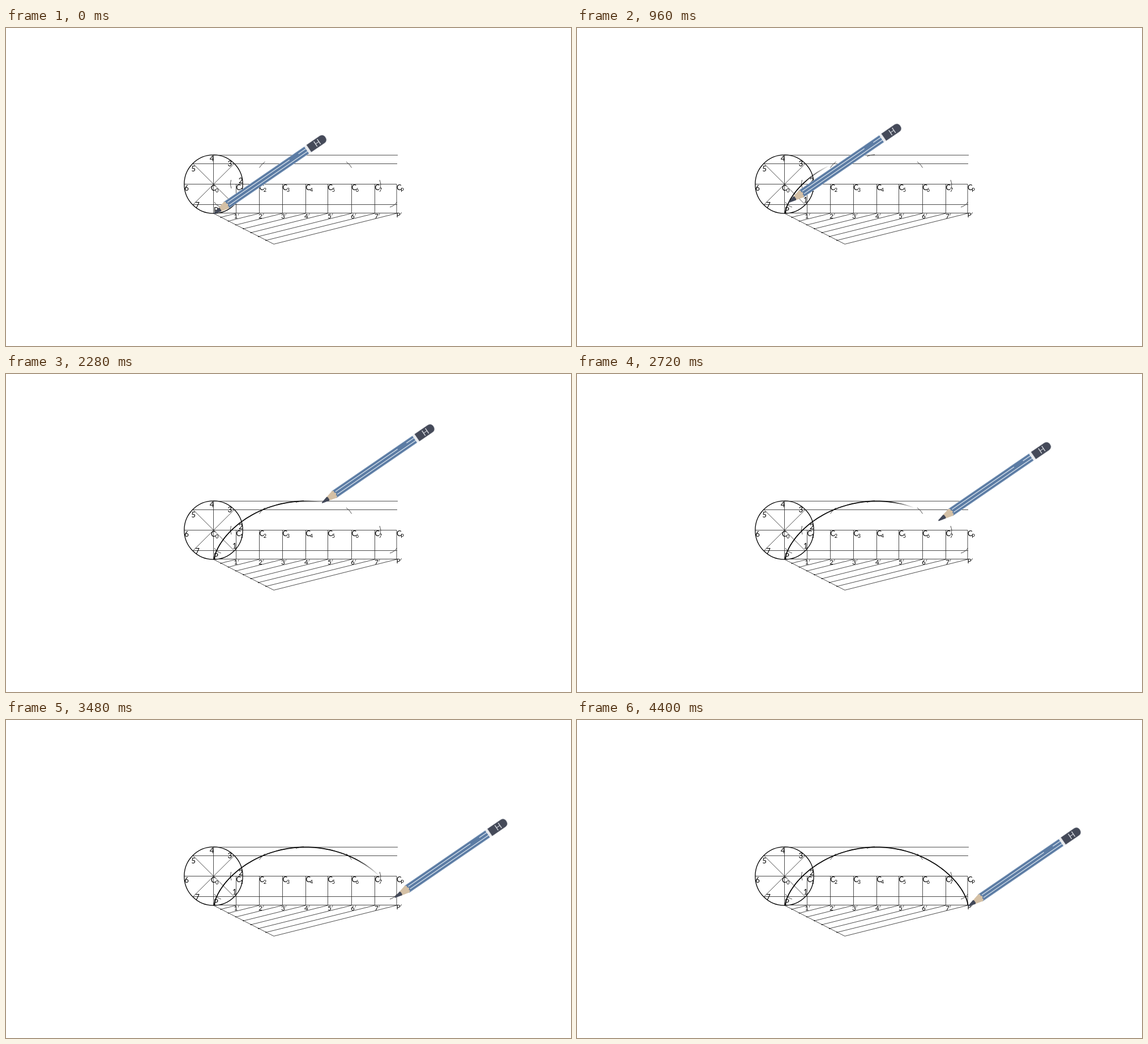
These frames come from a looping animation (998 by 561 pixels, 4440 ms). An HTML page:

```html
<!DOCTYPE html>
<html lang="en">
<head>
<meta charset="utf-8">
<title>Cycloid construction</title>
<style>
  html, body { margin: 0; width: 100%; height: 100%; overflow: hidden; background: #fff; }
  svg { display: block; width: 998px; height: 561px; }
  text { font-family: Lato, "Noto Sans", sans-serif; fill: #000; }
  .thin { fill: none; stroke: #2b2b2b; stroke-width: .85; }
  .bold { fill: none; stroke: #000; stroke-width: 1.7; }
</style>
</head>
<body>
<svg viewBox="0 0 998 561">
  <defs>
    <linearGradient id="fade" gradientUnits="userSpaceOnUse" x1="-42" y1="0" x2="0" y2="0">
      <stop offset="0" stop-color="#fff"/>
      <stop offset="1" stop-color="#000"/>
    </linearGradient>
    <mask id="wipe" maskUnits="userSpaceOnUse" x="0" y="0" width="998" height="561">
      <rect width="998" height="561" fill="url(#fade)"/>
    </mask>
  </defs>
  <g id="plan"></g>
  <g mask="url(#wipe)"><path id="curve" class="bold"/></g>
  <g id="pencil">
    <path d="M25 -7.3H198V7.3H25Z" fill="#5c7ca4" stroke="#b4c5d8" stroke-width=".7"/>
    <path d="M30 -2.8H163M182 -2.8H198M30 2.8H198" stroke="#dde7f0" stroke-width="1.2"/>
    <path d="M10 -3.4L25.5 -7.3Q30 -5 27 -2.8Q32 0 27 2.8Q30 5 25.5 7.3L10 3.4Z" fill="#d4c0a5"/>
    <path d="M-.8 -.8L12 -4Q14.5 -1.5 13 0Q14.5 1.5 12 4L-.8 .8Z" fill="#434959"/>
    <path d="M198 -7.5H202.5V7.5H198Z" fill="#e9ebee"/>
    <path d="M202.5 -7.7H231Q238 -7.2 238 0Q238 7.2 231 7.7H202.5Z" fill="#454a59" stroke="#b9bcc4" stroke-width=".5"/>
    <text x="220.5" y="5.3" text-anchor="middle" style="font-size:15px;fill:#d5d8de">H</text>
  </g>
</svg>
<script>
const NS = "http://www.w3.org/2000/svg";
const $ = id => document.getElementById(id);
const plan = $("plan");

function add(tag, attrs, text) {
  const el = document.createElementNS(NS, tag);
  for (const k in attrs) el.setAttribute(k, attrs[k]);
  if (text) el.textContent = text;
  plan.append(el);
}
const path = d => add("path", { d, class: "thin" });
const line = (x1, y1, x2, y2) => path(`M${x1} ${y1}L${x2} ${y2}`);
const label = (s, x, y, size) => add("text", { x, y, "font-size": size }, s);

// Construction lines
const CX = 366.5, CY = 275.5, R = 52, BASE = 326.5;
const stops = [406.5, 447.5, 488.5, 529.5, 568.5, 610.5, 651.5, 690];

add("circle", { cx: CX, cy: CY, r: R - .3, class: "bold", style: "stroke-width:1.3" });
line(CX, 224, CX, 327);
line(330, 239, 403.5, 312);
line(403.5, 239, 330, 312);
line(CX, 224.3, 692, 224.3);
line(330, 239.5, 691, 239.5);
line(314.5, CY, 690, CY);
line(330, 311.5, 691, 311.5);
line(CX, BASE, 691, BASE);
line(CX, 327, 473, 381.3);

stops.forEach((x, i) => {
  const k = (i + 1) / 8, px = CX + 106.5 * k, py = 327 + 54.3 * k;
  line(x, CY, x, 327);
  line(px, py, x, 327);
  if (i < 7) add("circle", { cx: px - .5, cy: py, r: .9 });
  label("C", x - .1, 286, 13);
  label("1234567P"[i], x + 7.3, 288.7, 9.2);
});
label("C", 362, 287, 13);
label("0", 370, 290, 9.2);

// Compass marks
["M368 307Q372 314 380 316", "M397.5 268Q395 275 398 283",
 "M447.5 246.5Q451.5 240 457.5 236", "M512 226.5Q518 224 526 223.5",
 "M601 236Q607 240 610.5 246.5", "M660 268Q663 275 661.5 282",
 "M678 316Q686 314 690.5 307"].forEach(path);

[["1", 400, 308], ["2", 410.8, 274], ["3", 391.5, 244], ["4", 359.8, 234.5],
 ["5", 327.3, 253], ["6", 315.3, 287], ["7", 334.3, 317], ["P", 367, 326]]
  .forEach(([s, x, y]) => label(s, x, y, 13.2));

[402.5, 446, 486, 527, 568, 609, 651, 689.5].forEach((x, i) => {
  const y = i < 7 ? 336 : 334;
  label("1234567P"[i], x, y, 11.8);
  line(x + 7.6, y - 5.5, x + 9, y - 8.8);
});

// Cycloid traced by a rolling circle of radius r, its flanks slightly flattened
const r = 51.4, TAU = Math.PI * 2;
const roll = a => [367.6 + r * (a - Math.sin(a)),
                   275.7 + r * Math.cos(a) + 1.2 * Math.sin(a) ** 2];
let d = "";
for (let i = 0; i <= 120; i++) {
  const [x, y] = roll(TAU * i / 120);
  d += (i ? "L" : "M") + x.toFixed(2) + " " + y.toFixed(2);
}
$("curve").setAttribute("d", d);

// Share of a full turn reached by the pencil at each time
const turns = [[0, 0], [600, .075], [1160, .197], [1720, .353], [2280, .545],
               [2840, .725], [3400, .857], [3960, .948], [4400, 1]];
const slope = i => {
  const a = turns[Math.max(i - 1, 0)], b = turns[Math.min(i + 1, turns.length - 1)];
  return (b[1] - a[1]) / (b[0] - a[0]);
};
function turnAt(t) {
  let i = 0;
  while (i < turns.length - 2 && t > turns[i + 1][0]) i++;
  const [t0, v0] = turns[i], [t1, v1] = turns[i + 1];
  const h = t1 - t0, u = (t - t0) / h, w = 1 - u;
  return v0 * w * w * (1 + 2 * u) + slope(i) * h * u * w * w
       + v1 * u * u * (3 - 2 * u) - slope(i + 1) * h * u * u * w;
}

const LOOP = 4440, STEP = 40;
function draw(now) {
  let t = Math.floor((now % LOOP) / STEP) * STEP;
  if (t < 80) t = 0;
  const turn = turnAt(t), [x, y] = roll(TAU * turn);
  // The pencil drifts a little off the curve towards the end
  $("pencil").setAttribute("transform",
    `translate(${x + .3 + turn} ${y + .8 * turn}) rotate(-34.4)`);
  $("fade").setAttribute("gradientTransform", `translate(${363 + .0853 * t} 0)`);
}

const start = performance.now();
function tick() {
  draw(performance.now() - start);
  requestAnimationFrame(tick);
}
tick();
</script>
</body>
</html>
```
